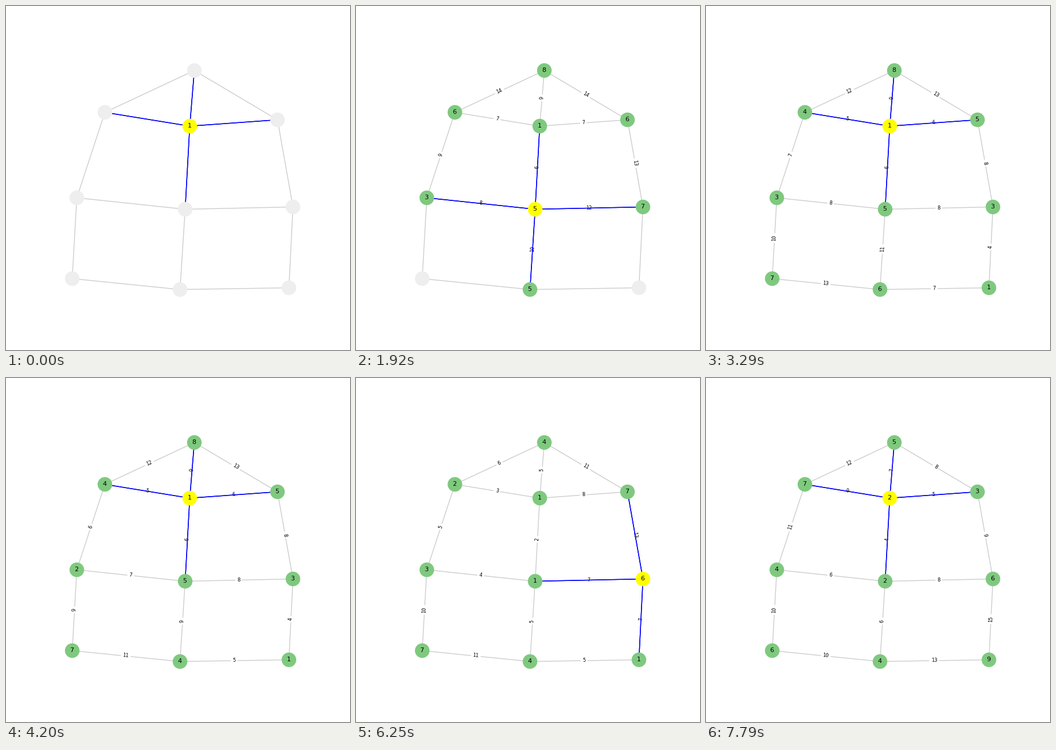
A matplotlib script that plays this animation: 600x600 px, repeating every 8000 ms.

```python
import math

import matplotlib.pyplot as plt
from matplotlib.animation import FuncAnimation
from matplotlib.collections import LineCollection

SIZE, DPI = 600, 100
LOOP_MS, INTERVAL = 8000, 20
GREEN, EMPTY, ACTIVE = "#7fc97f", "#eeeeee", "yellow"
TEXT_SHIFT = 0.5  # labels sit half a pixel up and left of pixel centres

# Nodes from top to bottom of the graph, in pixels
POS = {
    "top": (328, 112), "left": (172, 185), "core": (320, 209),
    "right": (473, 198), "west": (123, 334), "mid": (312, 354),
    "east": (500, 350), "sw": (115, 475), "south": (303, 494),
    "se": (493, 491),
}
EDGES = [
    ("top", "left"), ("top", "core"), ("top", "right"), ("left", "core"),
    ("core", "right"), ("left", "west"), ("core", "mid"), ("right", "east"),
    ("west", "mid"), ("mid", "east"), ("west", "sw"), ("mid", "south"),
    ("east", "se"), ("sw", "south"), ("south", "se"),
]

# Start time in ms, active node, values that change at that moment
STEPS = [
    (0, "core", dict(core=1)),
    (60, "mid", dict(mid=5)),
    (160, "left", dict(left=8)),
    (320, "west", dict(west=5)),
    (520, "south", dict(south=7, left=7)),
    (750, "right", dict(right=6, west=4)),
    (1050, "east", dict(east=7, south=6, left=6)),
    (1440, "top", dict(top=8, west=3, south=5)),
    (1800, "core", {}),
    (1860, "west", {}),
    (1920, "mid", {}),
    (1980, "east", dict(east=3)),
    (2040, "south", dict(south=6)),
    (2140, "sw", dict(sw=7)),
    (2440, "right", dict(right=1)),
    (2740, "top", {}),
    (3100, "se", dict(se=1)),
    (3130, "sw", {}),
    (3160, "left", dict(left=4)),
    (3190, "right", dict(right=5)),
    (3290, "core", {}),
    (3450, "west", dict(west=2)),
    (3580, "east", {}),
    (3810, "south", dict(south=4)),
    (4200, "core", {}),
    (4260, "mid", dict(mid=2)),
    (4360, "left", dict(left=3)),
    (4520, "west", dict(west=4, mid=1)),
    (4720, "south", dict(south=5, left=2)),
    (4950, "right", dict(right=6, west=3)),
    (5250, "east", dict(east=7)),
    (5640, "top", {}),
    (6030, "left", dict(top=4)),
    (6060, "mid", {}),
    (6090, "south", dict(south=4)),
    (6150, "right", dict(right=7)),
    (6250, "east", dict(east=6)),
    (6410, "se", dict(se=3)),
    (6670, "west", {}),
    (6770, "core", dict(core=8)),
    (7130, "sw", dict(sw=6)),
    (7160, "se", dict(se=8)),
    (7190, "top", dict(top=5)),
    (7250, "right", dict(right=3)),
    (7310, "west", dict(west=4)),
    (7370, "mid", dict(mid=2)),
    (7530, "left", dict(left=7)),
    (7790, "core", dict(core=2, se=9)),
]


def state_at(ms):
    """Active node and known values at a given time."""
    values, active = {}, None
    for start, node, changes in STEPS:
        if start > ms:
            break
        active = node
        values.update(changes)
    return active, values


def label_angle(a, b):
    """Angle of an edge, turned so that its label never stands on its head."""
    (x1, y1), (x2, y2) = POS[a], POS[b]
    angle = math.degrees(math.atan2(y1 - y2, x2 - x1))
    if angle > 90:
        angle -= 180
    if angle < -90:
        angle += 180
    return angle


def segment(edge):
    return [POS[node] for node in edge]


def add_label(x, y, **style):
    return ax.text(x - TEXT_SHIFT, y - TEXT_SHIFT, "",
                   ha="center", va="center", **style)


fig = plt.figure(figsize=(SIZE / DPI, SIZE / DPI), dpi=DPI, facecolor="white")
ax = fig.add_axes([0, 0, 1, 1])
ax.set_xlim(-0.5, SIZE - 0.5)
ax.set_ylim(SIZE - 0.5, -0.5)
ax.axis("off")

ax.add_collection(LineCollection([segment(e) for e in EDGES],
                                 colors="#cccccc", linewidths=1, zorder=1))

edge_labels = {}
for a, b in EDGES:
    (x1, y1), (x2, y2) = POS[a], POS[b]
    edge_labels[a, b] = add_label(
        (x1 + x2) / 2, (y1 + y2) / 2, fontsize=6,
        rotation=label_angle(a, b), zorder=2,
        bbox=dict(boxstyle="round", fc="white", ec="white"))

star = LineCollection([], colors="blue", linewidths=1, zorder=3)
ax.add_collection(star)

dots = ax.scatter(*zip(*POS.values()), s=300, linewidths=1, zorder=4)
node_labels = {node: add_label(x, y, fontsize=8, zorder=5)
               for node, (x, y) in POS.items()}


def update(frame):
    active, values = state_at(frame * INTERVAL + INTERVAL / 2)
    colors = [ACTIVE if n == active else GREEN if n in values else EMPTY
              for n in POS]
    dots.set_facecolor(colors)
    dots.set_edgecolor(colors)
    # Each link is drawn in both directions, which firms up its soft rims
    star.set_segments(2 * [segment(e) for e in EDGES if active in e])
    for node, label in node_labels.items():
        label.set_text(str(values.get(node, "")))
    for (a, b), label in edge_labels.items():
        known = a in values and b in values
        label.set_visible(known)
        if known:
            label.set_text(str(values[a] + values[b]))
    return [dots, star, *node_labels.values(), *edge_labels.values()]


anim = FuncAnimation(fig, update, frames=LOOP_MS // INTERVAL,
                     interval=INTERVAL, repeat=True, repeat_delay=0)
plt.show()
```
